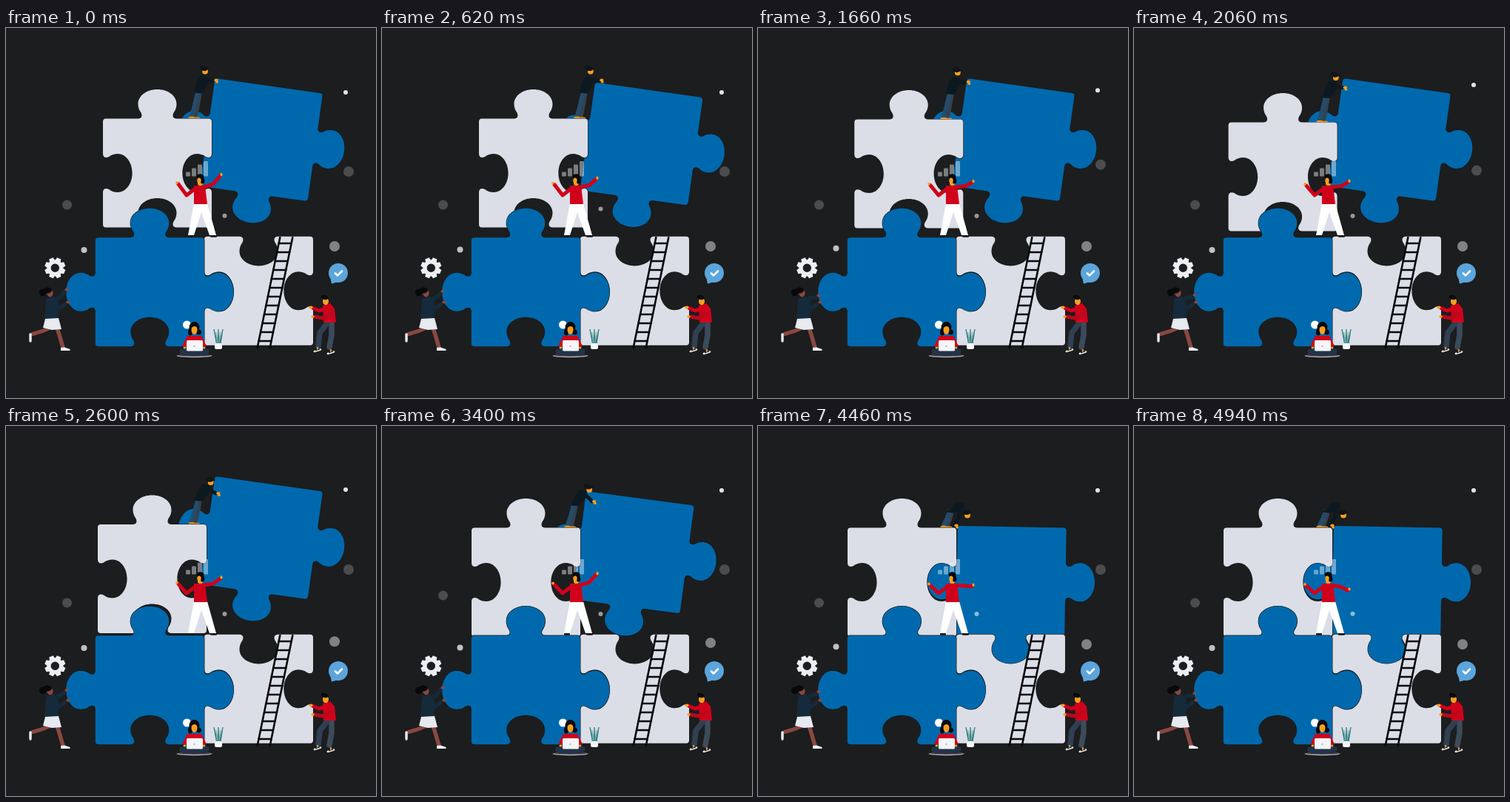
Recreate the animation shown at these times as an HTML page with a canvas. Size 500 by 500 pixels, loop 4960 ms.

```html
<!DOCTYPE html>
<html lang="en">
<head>
<meta charset="utf-8">
<title>Team puzzle</title>
<style>
html, body { margin: 0; width: 100%; height: 100%; overflow: hidden; background: #1c1d1e; }
canvas { display: block; }
</style>
</head>
<body>
<canvas id="stage" width="500" height="500"></canvas>
<script>
const LOOP = 4960, { PI, sin, cos, abs, exp, round } = Math;
const BG = '#1c1d1e', BLUE = '#0069ae', PALE = '#dbdee7', SKIN = '#f6a01f',
  RED = '#d0021b', NAVY = '#152a3a', BLACK = '#08090b', BROWN = '#8a4840';
const c = document.getElementById('stage').getContext('2d');

const linear = (t, from, to) => Math.min(1, Math.max(0, (t - from) / (to - from)));
const smooth = (t, from, to) => {
  const u = linear(t, from, to);
  return u * u * (3 - 2 * u);
};

// The shared motion: a nudge to the right, the pale piece settling, the blue one dropping in
function pose(t) {
  const drop = smooth(t, 3050, 3950);
  return {
    nudge: 6 * sin(PI * linear(t, 0, 1640)),
    settle: linear(t, 1550, 3050),
    drop,
    tip: drop ** 2.5
  };
}

function trace(pts) {
  c.beginPath();
  for (let i = 0; i < pts.length; i += 2) c.lineTo(pts[i], pts[i + 1]);
}
function poly(color, ...pts) {
  trace(pts);
  c.closePath();
  c.fillStyle = color;
  c.fill();
}
function limb(color, width, ...pts) {
  trace(pts);
  c.strokeStyle = color;
  c.lineWidth = width;
  c.lineCap = c.lineJoin = 'round';
  c.stroke();
}
function oval(color, x, y, rx, ry = rx, turn = 0) {
  c.beginPath();
  c.ellipse(x, y, rx, ry, turn, 0, 2 * PI);
  c.fillStyle = color;
  c.fill();
}
function box(color, x, y, w, h, r = 1) {
  c.beginPath();
  c.roundRect(x, y, w, h, r);
  c.fillStyle = color;
  c.fill();
}

// sides: top, right, bottom, left; 1 knob, -1 hole, 0 flat
function piece(color, x, y, deg, sides) {
  const h = 73.5;
  c.save();
  c.translate(x, y);
  c.rotate(deg * PI / 180);
  c.beginPath();
  for (const s of sides) {
    const v = d => -h - s * d;
    c.lineTo(-h + 4, -h);
    if (s) {
      c.lineTo(-26, -h);
      c.bezierCurveTo(-21, -h, -20, v(4), -22, v(8));
      c.bezierCurveTo(-25, v(12), -26, v(16), -26, v(20));
      c.bezierCurveTo(-26, v(31), -14.5, v(39.6), 0, v(39.6));
      c.bezierCurveTo(14.5, v(39.6), 26, v(31), 26, v(20));
      c.bezierCurveTo(26, v(16), 25, v(12), 22, v(8));
      c.bezierCurveTo(20, v(4), 21, -h, 26, -h);
    }
    c.lineTo(h - 4, -h);
    c.quadraticCurveTo(h, -h, h, -h + 4);
    c.rotate(PI / 2);
  }
  c.closePath();
  c.strokeStyle = BG;
  c.lineWidth = 1.4;
  c.stroke();
  c.fillStyle = color;
  c.fill();
  c.restore();
}

// Each dot hops once around its peak time, then again after its period
function dot(t, x, y, r, alpha, peak, period = LOOP) {
  const d = t - peak, away = d - round(d / period) * period;
  oval(`rgba(255,255,255,${alpha})`, x, y - 10 * exp(-((away / 350) ** 2)), r);
}
function dots(t) {
  dot(t, 459, 87, 3, .88, 2060);
  dot(t, 463, 194, 7, .21, 1570);
  dot(t, 82.5, 239, 6.5, .21, 3400);
  dot(t, 105.5, 300, 4, .72, 1240, 2760);
  dot(t, 444, 295, 7, .45, 2950);
  dot(t, 295.5, 254, 3, .55, 700);
}

function gear() {
  c.save();
  c.translate(66.3, 324.3);
  c.rotate(PI / 8);
  for (let i = 0; i < 8; i++) {
    poly('#eceef1', -4, -9, -2.9, -14, 2.9, -14, 4, -9);
    c.rotate(PI / 4);
  }
  oval('#eceef1', 0, 0, 11);
  oval(BG, 0, 0, 5.7);
  c.restore();
}

function bubble() {
  const color = '#5ba5dc';
  oval(color, 449, 331, 13);
  poly(color, 438, 336, 440, 345.5, 449, 343);
  limb('#fff', 2.6, 445, 331.5, 448, 334.5, 454, 328.5);
}

function ladder() {
  const left = y => 370.5 - 31 * (y - 282) / 151;
  for (const dx of [0, 17]) limb(BLACK, 2.6, left(283) + dx, 283, left(432) + dx, 432);
  for (let y = 291; y < 430; y += 12) limb(BLACK, 2.4, left(y), y, left(y) + 17, y);
}

function bars() {
  [6, 11, 16, 20.5].forEach((h, i) => box('rgba(235,240,245,.46)', 243 + i * 8, 200.5 - h, 6, h));
}

function climber({ nudge, settle, tip }) {
  c.save();
  c.translate(251 + 2.3 * nudge, 121.5 + 15 * settle);
  // Joints relative to the feet: stand, lean over, fold down
  const hy = -35 + 4 * settle + 10 * tip;
  const sx = 15 + 4 * settle + tip, sy = -52 + 5 * settle + 18 * tip;
  const x = 17 + 11 * settle + 3 * tip, y = -64 + 10 * settle + 37 * tip;
  const ax = 33 + 4 * settle - 20 * tip, ay = -51 + 14 * settle + 35 * tip;
  limb('#35414d', 6, 11, hy, 8, hy / 2, 5, -3);
  limb('#244c6b', 6, 8, hy, 4, hy / 2, 0, -3);
  oval(SKIN, 0, 0, 4.5, 1.9);
  oval(SKIN, 7, .5, 4.5, 1.7);
  const coat = '#0d1921';
  poly(coat, 3, hy + 1, sx - 8, sy + 2, sx - 3, sy - 5, sx + 6, sy - 3, sx + 8, sy + 4, 14, hy + 2);
  limb(coat, 5, sx + 2, sy, (sx + ax) / 2 + 2, (sy + ay) / 2 + 2, ax - 3, ay);
  oval(SKIN, ax, ay, 2.7, 1.9);
  oval(SKIN, ax + 1, ay + 2.5, 2, 1.6);
  oval(SKIN, x + 1, y + 1, 3.9, 4);
  oval('#11151a', x - 1, y - 3, 5.6, 3.5, .2);
  limb('#11151a', 1.8, x + 2, y - 3, x + 6, y - 2);
  c.restore();
}

function director(t) {
  const u = t / LOOP, ly = 209 + 5 * u;
  const ry = 198 + abs(sin(PI * t / 3300)) * (8.5 + 14 * u ** 3);
  poly('#fff', 254, 237, 272, 237, 284, 280, 275, 280, 264, 249, 254, 280, 246, 280);
  box('#17191c', 246, 280, 8, 2.8);
  box('#17191c', 276, 280, 9, 2.8);
  limb(RED, 5, 257, 216, 244, 226, 233, ly + 2);
  limb(RED, 5, 267, 215, 280, 211 + (ry - 198) * .3, 289, ry + 2);
  oval(SKIN, 231, ly, 1.8, 2);
  oval(SKIN, 291, ry, 1.6, 2.2);
  poly(RED, 254, 213, 269, 213, 272, 238, 254, 238);
  box(SKIN, 259, 203, 7, 10, 3);
  oval(BLACK, 262.5, 201, 5, 3.8);
  oval(BLACK, 265.5, 206.5, 2.8, 4);
  oval(SKIN, 261, 206, 2.7, 3.6);
}

function pusher(t) {
  const y = 356.5 - 4 * cos(2 * PI * t / 3400);
  limb(BROWN, 5, 60, 405, 51, 409, 36, 413.5);
  limb('#eef0f4', 3.4, 33, 414, 33, 423);
  limb(BROWN, 5.5, 69, 405, 73, 418, 77, 432);
  poly('#eef0f4', 74, 432, 79, 431.5, 86.5, 434, 86.5, 436, 74, 436);
  limb(NAVY, 5.5, 61, 368, 73, 364, 79, y + 4);
  oval(BROWN, 82, y + 1, 2.6, 2);
  poly(NAVY, 54, 366, 64, 362, 71, 367, 71, 394, 52, 394);
  limb(NAVY, 5.5, 64, 375, 72, 379, 80, 373);
  oval(BROWN, 84, 370.5, 2.6, 2);
  poly('#e8eaf1', 53, 393, 71, 392, 75, 407, 62, 408, 50, 405);
  oval(BROWN, 59.5, 358.5, 4, 5);
  oval(BLACK, 49.5, 357.5, 4.8);
  oval(BLACK, 56, 354.5, 5.8, 4);
}

function builder() {
  limb('#3c4b5c', 7.5, 440, 399, 440, 415, 437, 431);
  limb('#2f4054', 7.5, 434, 399, 424, 412, 422, 430);
  for (const [x, y] of [[421, 436], [439, 439]]) {
    limb(SKIN, 2, x, y - 4, x, y - 2);
    limb('#eef0f4', 2.6, x - 4, y + 1, x + 4, y - 1.5);
    limb(BLACK, 1, x - 3, y, x + 3, y - 2);
  }
  poly(RED, 428, 375, 438, 372, 444, 379, 446, 398, 429, 398);
  limb(RED, 5, 433, 379, 423, 382, 415, 378.5);
  limb('#b80a1c', 5, 440, 386, 428, 392, 417, 390);
  oval(SKIN, 412, 377.5, 2.6, 1.9);
  oval(SKIN, 414.5, 390, 2.2, 1.7);
  oval(SKIN, 432, 369.5, 4, 4.8);
  oval(BLACK, 430.5, 364, 5, 2.8, .3);
}

function coder() {
  oval('#fff', 244.5, 401, 5.5);
  oval('#aeb0b5', 254.5, 443, 24, 2.2);
  oval('#3c2c32', 254.5, 442.3, 22, 1.5);
  oval(BLACK, 254.5, 404.5, 7, 7.5);
  oval(BLACK, 249, 411, 3, 4.5);
  oval(BLACK, 260.5, 411, 3.5, 3.5);
  limb('#22344a', 7, 238, 437, 254, 434, 271, 437);
  limb('#22344a', 5, 241, 440, 268, 440);
  poly(RED, 245, 416, 264, 416, 271, 430, 238, 430);
  oval(SKIN, 254.5, 408, 4, 6);
  poly(BLACK, 249, 405, 255, 398, 261, 405, 255, 403);
  box('#f4f5f8', 244, 422, 22, 14.5, 1.5);
  oval('#b9bcc4', 254.5, 430, 1.3);
  oval(SKIN, 241.5, 432, 2, 1.4);
  oval(SKIN, 267.5, 432, 2, 1.4);
}

function plant() {
  for (let i = 0; i < 5; i++) {
    const x = 281 + i * 3, top = i % 2 ? 411 : 407;
    poly(i % 2 ? '#79b7b2' : '#347b7d', 284 + i, 427, x - .6, top, x + .6, top, 286.5 + i, 427);
  }
  box('#f5f6f8', 282, 426, 10, 8, 2);
}

function draw(now) {
  const t = now % LOOP, p = pose(t);
  c.fillStyle = BG;
  c.fillRect(0, 0, 500, 500);
  piece(BLUE, 345 + p.nudge - 3 * p.drop - 21 * p.drop * (1 - p.drop),
    151 + p.nudge + 58.7 * p.drop, 8 - 7 * p.tip, [0, 1, 1, 1]);
  climber(p);
  piece(PALE, 204.5 - 10 * p.settle, 196 + 15 * p.settle, 0, [1, -1, -1, -1]);
  piece(PALE, 341.5, 355.3, 0, [-1, -1, 0, -1]);
  piece(BLUE, 194.3, 356.8, 0, [1, 1, -1, 1]);
  dots(t);
  gear();
  bubble();
  ladder();
  bars();
  director(t);
  pusher(t);
  builder();
  coder();
  plant();
  requestAnimationFrame(draw);
}
requestAnimationFrame(draw);
</script>
</body>
</html>
```
